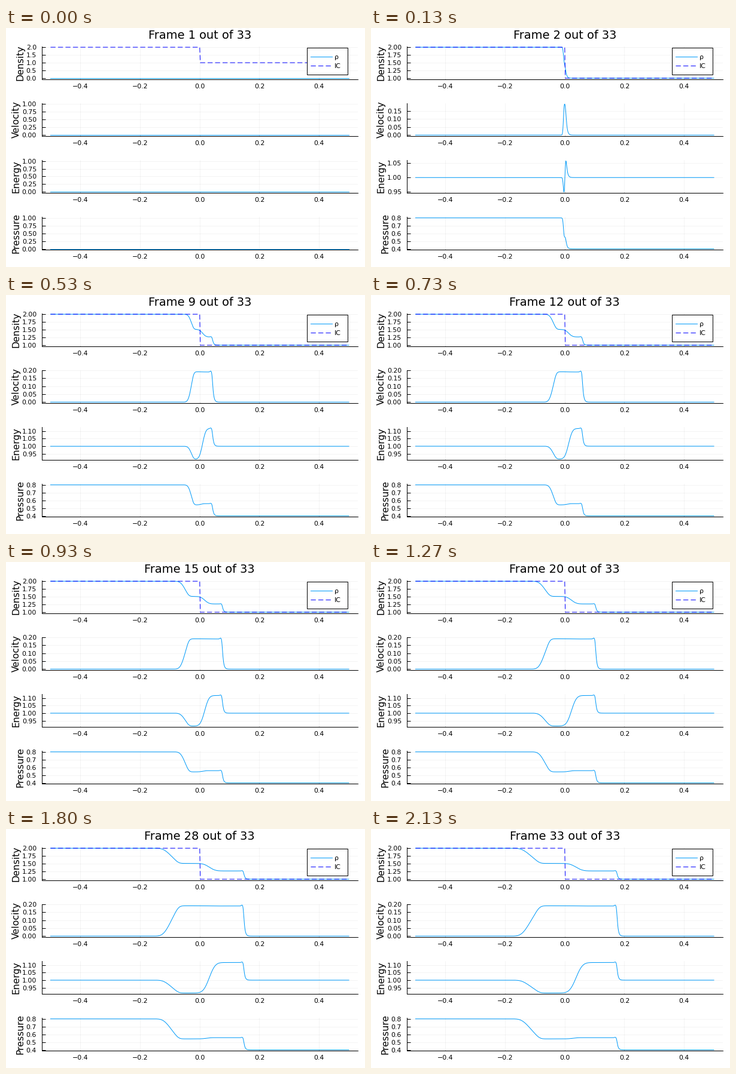
A matplotlib script that plays this animation: 600 px wide and 400 px high, repeating every 2.19 s.

```python
import math

import matplotlib.pyplot as plt
import numpy as np
from matplotlib.animation import FuncAnimation
from matplotlib.lines import Line2D
from matplotlib.patches import Rectangle
from matplotlib.ticker import MultipleLocator

W, H, DPI = 600, 400, 100
FRAMES, LOOP_MS = 33, 2190
T_END = 0.2
PX = 72 / DPI  # points per pixel
LEFT, RIGHT, HEIGHT = 59.5, 588, 55
TOPS = [30.6 + 95.2 * n for n in range(4)]
NAMES = ("Density", "Velocity", "Energy", "Pressure")
START_STEPS = (0.5, 0.25, 0.25, 0.25)
STEPS = (0.25, 0.05, 0.05, 0.1)
BLUE, IC_BLUE = "#009af9", "#0000ff"
LINE = PX
DASH = (0, (8.3, 4.2))

plt.rcParams.update({
    "font.family": "DejaVu Sans",
    "axes.unicode_minus": True,
    "lines.scale_dashes": True,
})

x = np.linspace(-0.5, 0.5, 1001)
erf = np.vectorize(math.erf)


def cdf(z):
    return 0.5 * (1 + erf(z / math.sqrt(2)))


def soft_ramp(z, s):
    """Ramp max(z, 0) blurred by a Gaussian of width s."""
    return z * cdf(z / s) + s * np.exp(-0.5 * (z / s) ** 2) / math.sqrt(2 * math.pi)


def solve(t):
    """Density, velocity, energy and pressure of the diffused shock tube."""
    root = math.sqrt(t)
    head, tail = -0.715 * t, -0.42 * t
    fan = (soft_ramp(x - head, 0.0313 * root)
           - soft_ramp(x - tail, 0.0201 * root)) / (tail - head)
    contact = cdf((x - 0.19 * t) / (0.0385 * root))

    z = x - 0.883 * t
    w, k = 0.0012, 0.35
    shock = np.exp(-k * np.logaddexp(0, (z + 0.0022) / w))
    shock = shock * (1 + 0.037 * np.exp(-0.5 * ((z + 0.0065) / 0.0028) ** 2))

    def waves(left, mid_left, mid_right, right):
        inner = left + (mid_left - left) * fan + (mid_right - mid_left) * contact
        return right + (inner - right) * shock

    rho = waves(2, 1.51, 1.268, 1)
    u = waves(0, 0.191, 0.1898, 0)
    e = waves(1, 0.915, 1.117, 1)
    return rho, u, e, 0.4 * rho * (e - u ** 2 / 2)


fig = plt.figure(figsize=(W / DPI, H / DPI), dpi=DPI, facecolor="white")


def make_panel(top):
    ax = fig.add_axes([LEFT / W, 1 - (top + HEIGHT) / H, (RIGHT - LEFT) / W, HEIGHT / H])
    ax.set_xlim(-0.53, 0.53)
    ax.xaxis.set_major_locator(MultipleLocator(0.2))
    ax.spines[["top", "right"]].set_visible(False)
    ax.spines[["left", "bottom"]].set_linewidth(LINE)
    ax.tick_params(direction="in", width=LINE, labelsize=11 * PX)
    ax.tick_params(axis="x", length=0.7 * PX, pad=7 * PX)
    ax.tick_params(axis="y", length=6.3 * PX, pad=8.5 * PX)
    ax.grid(color="black", alpha=0.06, linewidth=0.7 * PX)
    ax.set_axisbelow(True)
    return ax


panels = [make_panel(top) for top in TOPS]
curves = [ax.plot([], [], color=BLUE, lw=LINE, clip_on=False)[0] for ax in panels]
panels[0].plot([-0.5, 0, 0.002, 0.5], [2, 2, 1, 1], color=IC_BLUE, lw=LINE,
               ls=DASH, dash_capstyle="butt", clip_on=False)

# Overlay in pixel coordinates for title, axis names and legend.
over = fig.add_axes([0, 0, 1, 1])
over.set(xlim=(0, W), ylim=(H, 0))
over.axis("off")
title = over.text(323.75, 18, "", ha="center", va="baseline", fontsize=19.4 * PX)
labels = [over.text(22, top + HEIGHT / 2, name, rotation=90, rotation_mode="anchor",
                    ha="center", va="baseline", fontsize=15.6 * PX)
          for name, top in zip(NAMES, TOPS)]
over.add_patch(Rectangle((503, 33), 68, 45, fc="white", ec="black", lw=LINE))
for y, name, color, style in ((48, "ρ", BLUE, "-"), (63, "IC", IC_BLUE, DASH)):
    over.add_line(Line2D([508.5, 545], [y, y], color=color, lw=LINE, ls=style,
                         dash_capstyle="butt"))
    over.text(549, y + 4, name, va="baseline", fontsize=11 * PX)


def update(i):
    title.set_text(f"Frame {i + 1} out of {FRAMES}")
    data = solve(T_END * i / (FRAMES - 1)) if i else [0 * x] * 4
    steps = STEPS if i else START_STEPS
    for n, (ax, y) in enumerate(zip(panels, data)):
        curves[n].set_data(x, y)
        lo, hi = (y.min(), y.max()) if i else (0, 1)
        if n == 0:
            lo, hi = min(lo, 1), 2
        pad = 0.03 * (hi - lo)
        ax.set_ylim(lo - pad, hi + pad)
        ax.yaxis.set_major_locator(MultipleLocator(steps[n]))
        # One-decimal tick labels leave the axis name closer to the axis.
        labels[n].set_x(28.5 if steps[n] in (0.5, 0.1) else 21.5)
    return curves


anim = FuncAnimation(fig, update, frames=FRAMES, interval=LOOP_MS / FRAMES,
                     repeat=True, repeat_delay=0, blit=False)
plt.show()
```
